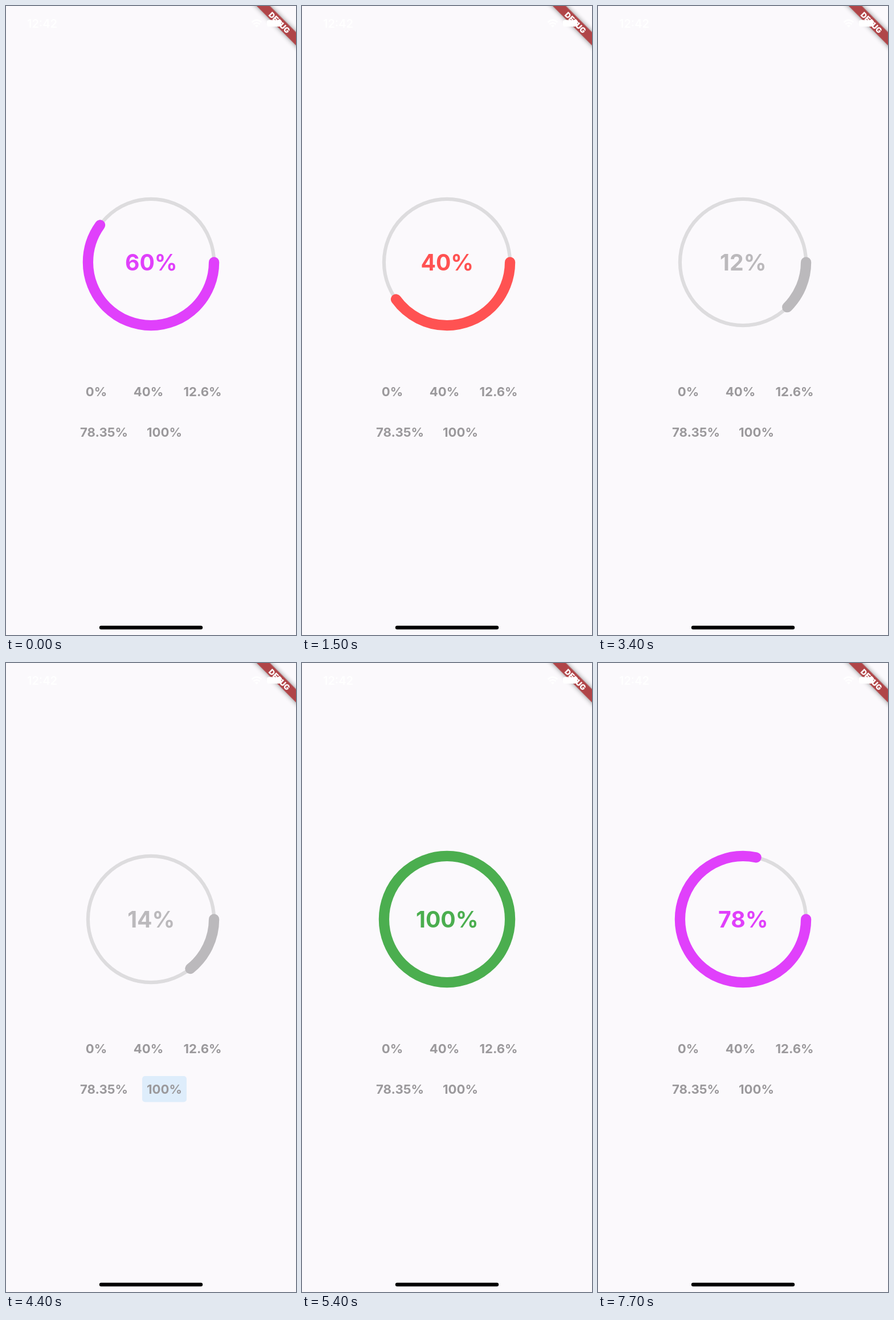
These frames come from a looping animation (509x1101 px, 8 s). An HTML page:

```html
<!DOCTYPE html>
<html lang="en">
<head>
<meta charset="utf-8">
<title>Circular progress</title>
<style>
  html, body { margin: 0; width: 100%; height: 100%; overflow: hidden; background: #fbf9fc; }
  svg { display: block; width: 100%; height: 100%; }
  text { font-family: Inter, Roboto, sans-serif; font-weight: 700; text-anchor: middle; }
  #label { font-size: 39.2px; }
  #buttons text { font-size: 22.2px; fill: #9b999c; }
  #buttons rect { fill: #deedfb; }
  .ribbon { fill: #b04548; filter: drop-shadow(0 0 4px #0007); }
  .ribbon-text { font-size: 13.3px; font-weight: 900; }
  .status text { font-size: 20px; font-weight: 600; }
</style>
</head>
<body>
<svg viewBox="0 0 509 1101">
  <g transform="translate(509 0) rotate(45)">
    <rect class="ribbon" x="-60" y="32.4" width="120" height="16.4"/>
    <text class="ribbon-text" y="46" fill="#fff">DEBUG</text>
  </g>
  <g class="status" fill="#fff">
    <text x="63.5" y="38">12:42</text>
    <path d="M431.5 28.5Q440 20.5 448.5 28.5M434.5 32Q440 27 445.5 32" fill="none" stroke="#fff" stroke-width="2.6"/>
    <path d="M437 34.5Q440 32 443 34.5L440 37.5Z"/>
    <rect x="458" y="24.5" width="25" height="11.5" rx="3.5"/>
    <rect x="484" y="28" width="1.5" height="4.5" rx=".7"/>
  </g>

  <g fill="none">
    <circle cx="254.5" cy="448.5" r="110.6" stroke="#dddcde" stroke-width="6.2"/>
    <circle id="arc" cx="254.5" cy="448.5" r="110.6" pathLength="100" stroke-width="18.3" stroke-linecap="round"/>
  </g>
  <text id="label" x="254.8" y="462.7"></text>
  <g id="buttons"></g>
  <rect x="163.8" y="1084.8" width="181.4" height="6.4" rx="3.2"/>
</svg>
<script>
const LOOP = 8000, STEP = 100, DURATION = 1000;
const arc = document.getElementById('arc');
const label = document.getElementById('label');
const group = document.getElementById('buttons');

// text, centre x, top, width
const buttons = [
  ['0%', 158.5, 652, 78],
  ['40%', 250, 652, 78],
  ['12.6%', 345, 652, 88],
  ['78.35%', 172, 723, 106],
  ['100%', 278, 723, 78]
];

const moves = [
  { start: 495, from: 60, to: 40, button: 1 },
  { start: 2385, from: 40, to: 12.6, button: 2 },
  { start: 4301, from: 12.6, to: 100, button: 4 },
  { start: 6620, from: 100, to: 78.35, button: 3 }
];

function add(tag, attributes, content = '') {
  const node = document.createElementNS('http://www.w3.org/2000/svg', tag);
  for (const key in attributes) node.setAttribute(key, attributes[key]);
  node.textContent = content;
  return group.appendChild(node);
}

const highlights = buttons.map(([text, x, y, width]) => {
  const rect = add('rect', { x: x - width / 2, y, width, height: 45.5, rx: 5, opacity: 0 });
  add('text', { x, y: y + 31 }, text);
  return rect;
});

const clamp = x => Math.max(0, Math.min(1, x));

// cubic-bezier(.42, 0, .58, 1)
function easeInOut(x) {
  if (x <= 0 || x >= 1) return clamp(x);
  let low = 0, high = 1, u;
  for (let i = 0; i < 30; i++) {
    u = (low + high) / 2;
    const bx = 1.26 * u * (1 - u) ** 2 + 1.74 * u * u * (1 - u) + u ** 3;
    if (bx < x) low = u; else high = u;
  }
  return u * u * (3 - 2 * u);
}

function colorOf(value) {
  if (value >= 100) return '#4bae4f';
  if (value > 40) return '#e040fb';
  return value >= 20 ? '#ff5252' : '#bbb9bc';
}

function draw(now) {
  const time = Math.floor((now % LOOP) / STEP) * STEP;
  let value = moves[0].from;
  for (const { start, from, to, button } of moves) {
    const age = time - start;
    if (age >= 0) {
      const p = easeInOut(age / DURATION);
      value = from * (1 - p) + to * p;
    }
    const press = Math.min(clamp((age + 60) / 110), clamp((390 - age) / 180));
    highlights[button].setAttribute('opacity', press);
  }
  const color = colorOf(value);
  arc.setAttribute('stroke', color);
  arc.setAttribute('stroke-dasharray', value >= 100 ? 'none' : `${value} 200`);
  label.setAttribute('fill', color);
  label.textContent = Math.floor(value) + '%';
  requestAnimationFrame(draw);
}
draw(performance.now());
</script>
</body>
</html>
```
